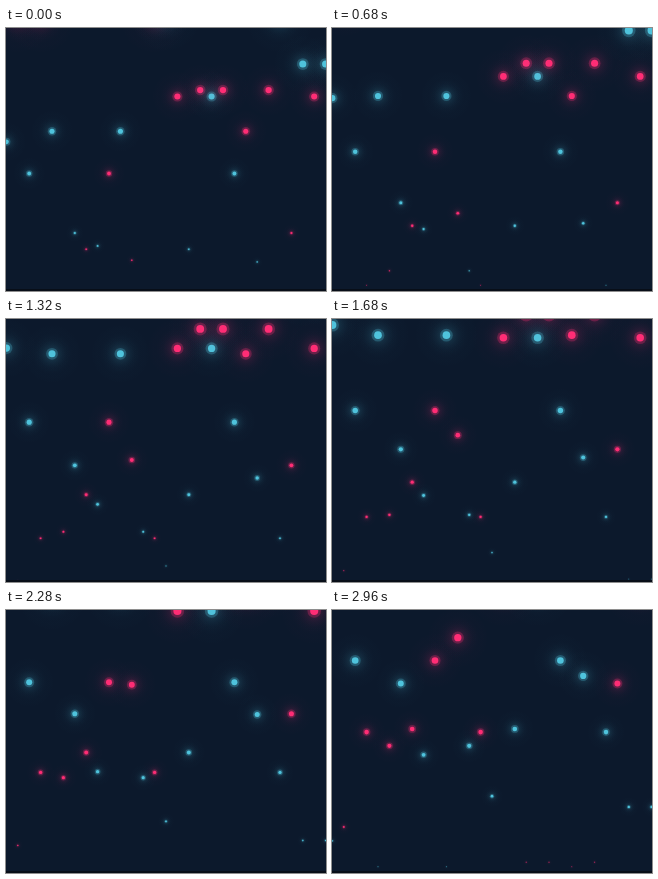
An HTML page with a canvas that plays this animation: 320 px wide and 263 px high, repeating every 3000 ms.

```html
<!DOCTYPE html>
<html lang="en">
<head>
<meta charset="utf-8">
<title>Rising bubbles</title>
<style>
  html, body { margin: 0; width: 100%; height: 100%; overflow: hidden; background: #0c192c; }
  canvas { display: block; width: 320px; height: 263px; }
</style>
</head>
<body>
<canvas id="stage" width="320" height="263"></canvas>
<script>
const W = 320, H = 263, LOOP = 3000, STEP = 40;
const GAP = 11.4, RADIUS = 4.5, HALO = 7.5;
const START_Y = 277.4, TRAVEL = 307, PERIOD = 124400;
const CYAN = '79,195,220', PINK = '255,45,117';

// Relative speed of each bubble, left to right.
const speeds = [26, 11, 13, 24, 21, 19, 18, 14, 10, 13, 21, 28, 19, 24, 15,
                12, 14, 16, 12, 16, 13, 21, 23, 16, 24, 18, 20, 12, 20];

const ctx = document.getElementById('stage').getContext('2d');

function disc(r, fill) {
  ctx.fillStyle = fill;
  ctx.beginPath();
  ctx.arc(0, 0, r, 0, Math.PI * 2);
  ctx.fill();
}

// Soft glow: a disc of RADIUS blurred by sigma.
function glow(sigma, rgb) {
  const spread = sigma * sigma + RADIUS * RADIUS / 4;
  const peak = RADIUS * RADIUS / (2 * spread);
  const reach = 3 * Math.sqrt(spread);
  const g = ctx.createRadialGradient(0, 0, 0, 0, 0, reach);
  for (let n = 0; n <= 12; n++) {
    const d = n / 12;
    const a = n === 12 ? 0 : peak * Math.exp(-4.5 * d * d);
    g.addColorStop(d, `rgba(${rgb},${a.toFixed(5)})`);
  }
  disc(reach, g);
}

function bubble(speed, k, t) {
  const phase = 0.69945 * speed + 0.001993 * speed * speed;
  const p = (phase + t * speed / PERIOD) % 1;
  const rgb = k % 2 ? PINK : CYAN;
  ctx.save();
  ctx.translate(W / 2 + (k - 14) * GAP, START_Y - p * TRAVEL);
  ctx.scale(p, p);
  glow(15, rgb);
  glow(7.5, rgb);
  disc(HALO, `rgba(${rgb},0.267)`);
  disc(RADIUS, `rgb(${rgb})`);
  ctx.restore();
}

function draw(t) {
  ctx.fillStyle = '#0c192c';
  ctx.fillRect(0, 0, W, H);
  speeds.forEach((s, k) => bubble(s, k, t));
  ctx.fillStyle = '#080e18';
  ctx.fillRect(0, 261, W, 2);
}

const begin = performance.now();
function tick() {
  const t = (performance.now() - begin) % LOOP;
  draw(Math.floor(t / STEP) * STEP);
  requestAnimationFrame(tick);
}
tick();
</script>
</body>
</html>
```
